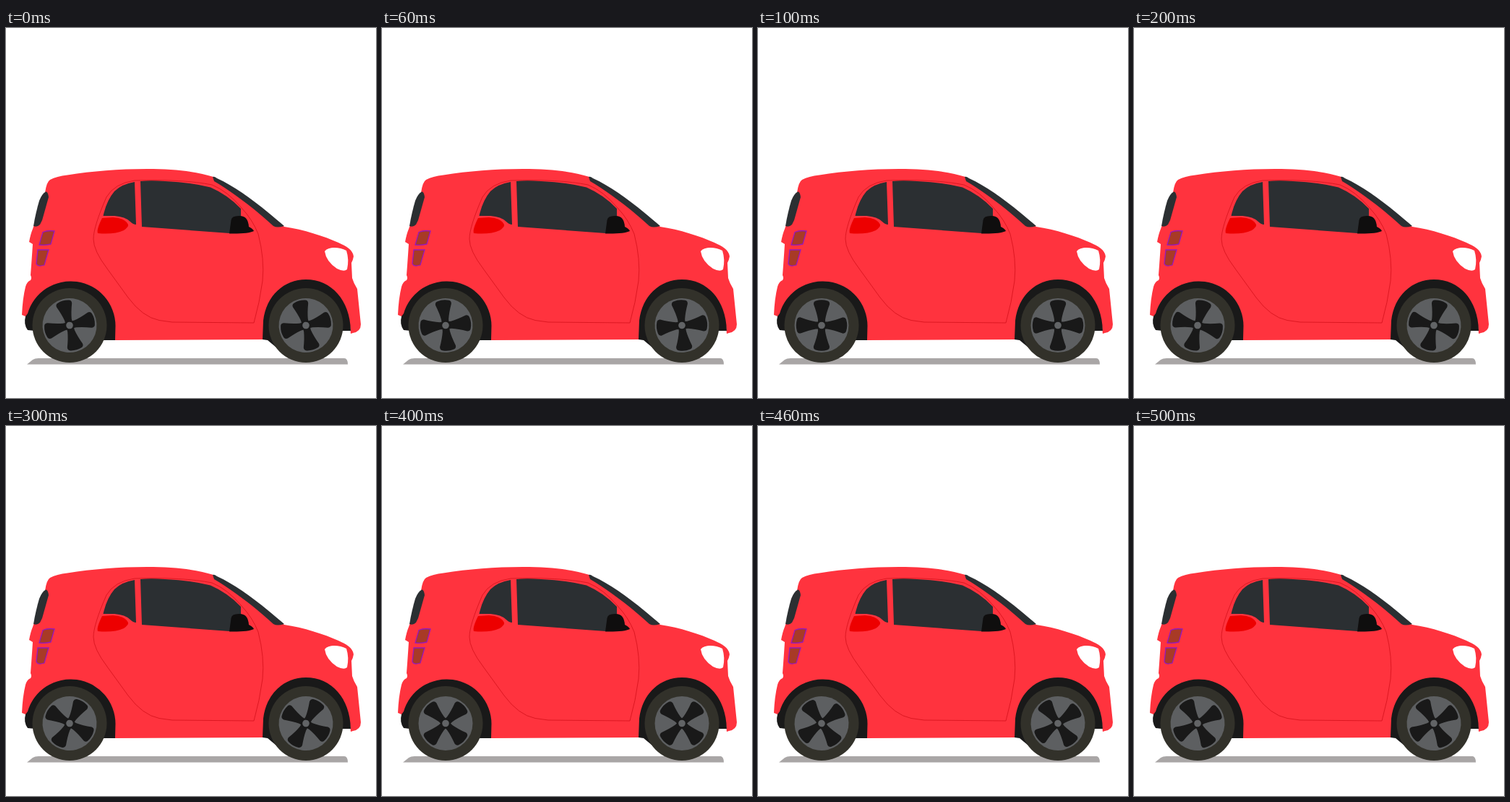
These frames come from a looping animation (512x512 px, 600 ms). An HTML page:

```html
<!DOCTYPE html>
<html lang="en">
<head>
<meta charset="utf-8">
<title>Red car</title>
<style>
  html, body { margin: 0; height: 100%; overflow: hidden; background: #fff; }
  svg { display: block; width: 100vw; height: 100vh; }
  .glass { fill: #2b2f32; }
  .arch { fill: #191919; }
  .lamp { fill: #a83a26; stroke: #9618bc; stroke-width: 1.3; }
</style>
</head>
<body>
<svg viewBox="0 0 512 512">
  <defs>
    <path id="blade" fill="#191919" d="M-5 0 L-5 -8 Q-6.500 -17 -11 -29 Q-11.500 -33 -8 -34 Q0 -36.500 8 -34 Q11.500 -33 11 -29 Q6.500 -17 5 -8 V0Z"/>
    <g id="rim">
      <circle r="37.500" fill="#5d5f61"/>
      <use href="#blade"/>
      <use href="#blade" transform="rotate(90)"/>
      <use href="#blade" transform="rotate(180)"/>
      <use href="#blade" transform="rotate(270)"/>
      <circle r="6.500" fill="#191919"/>
      <circle r="4.800" fill="#626466"/>
    </g>
  </defs>

  <!-- Ground shadow -->
  <path fill="#a9a6a6" d="M29 465.500 L37 459 Q40 457 45 457 H468 Q473 457 473 465.500Z"/>

  <!-- Body -->
  <path fill="#ff333e" d="M54 228 Q56 213 61 210 Q70 205 85 203.500 C120 198 155 195 195 195 C235 195 265 199 287 206
    L385 275 C412 279 440 288 460 297 C471 302 480 307 481 316 Q480 322 478 325 L479 346 Q481 353 486 361
    L491 410 Q491 420 480 422 L477 423 L476 412 L356 431 L150 432 L27 399 L22 397 Q23 374 27 358 Q29 351 34 349
    Q36 346 34 342 C35 328 36 315 37 299 L32 296 Q34 285 37 278Z"/>

  <!-- Wheel arches -->
  <path class="arch" d="M27 399 L30 395 A62 62 0 0 1 151.500 412 L151 432 H135 L40 419 L30 418 Q24 410 27 399Z"/>
  <path class="arch" d="M355 431 L356 405 C360 370 385 348 415 348 C450 348 476 376 477 419 H466 L380 447 L368 437 L362 432Z"/>

  <!-- Door seam -->
  <path fill="none" stroke="#d9151f" stroke-width=".9" d="M178 211 Q150 215 139 234 Q121 275 121 292 Q121 308 140 333
    L169 373 Q189 400 212 404.500 L230 407 L343 408 Q351 380 355 350 Q358 320 349 285 Q341 265 326 249
    Q307 226 285 217 Q245 209 178 211"/>

  <!-- Windows -->
  <path class="glass" d="M55 226.500 Q50 229 46 239 Q41 256 38 274 Q43 276 47 272 L50 266 L59 234 Q58 226 55 226.500Z"/>
  <path class="glass" d="M178 213 Q160 216 150 226 Q139 239 134.500 260 H150 Q165 261 172 268 Q176 272 180 272Z"/>
  <path class="glass" d="M186 212 Q200 210.500 220 212 Q257 214 283 220.500 Q307 231 325 250 V284 H309 L188 275Z"/>
  <path class="glass" d="M286 206 Q288 205 292 208 C322 222 350 244 385 274 Q375 277 370 274 C345 251 315 228 288 212Z"/>

  <!-- Handle, mirror and lamps -->
  <path fill="#ed0000" d="M133 263 Q125 279 127 284 Q150 286 163 280 Q170 275 169 272 Q165 263 148 262Z"/>
  <path fill="#0f0e0e" d="M309 284.500 L311.500 266 Q312 260 322 260 Q335 259 336 275 Q342 278 343 281 Q335 285 309 284.500Z"/>
  <path class="lamp" d="M51 282.500 Q58 279.500 67 281 L62 299 Q54 301 46 300Z"/>
  <path class="lamp" d="M44 307 H59 L53 328 Q44 331 42 326Z"/>
  <path fill="#fff" d="M441 309 C445 303 460 302 471 308 Q475 320 472 334 Q468 338 458 333 Q443 323 441 309Z"/>

  <!-- Wheels -->
  <g transform="translate(88 411.500)">
    <circle r="51.500" fill="#32312a"/>
    <use class="spin" href="#rim"/>
  </g>
  <g transform="translate(415 411.500)">
    <circle r="51.500" fill="#32312a"/>
    <use class="spin" href="#rim"/>
  </g>
</svg>
<script>
  const LOOP = 600;
  const rims = document.querySelectorAll(".spin");

  // Four equal blades: a quarter turn closes the loop.
  function draw(now) {
    const angle = (now % LOOP) / LOOP * 90 - 15;
    for (const rim of rims) rim.setAttribute("transform", `rotate(${angle})`);
  }

  function tick() {
    draw(performance.now());
    requestAnimationFrame(tick);
  }
  tick();
</script>
</body>
</html>
```
